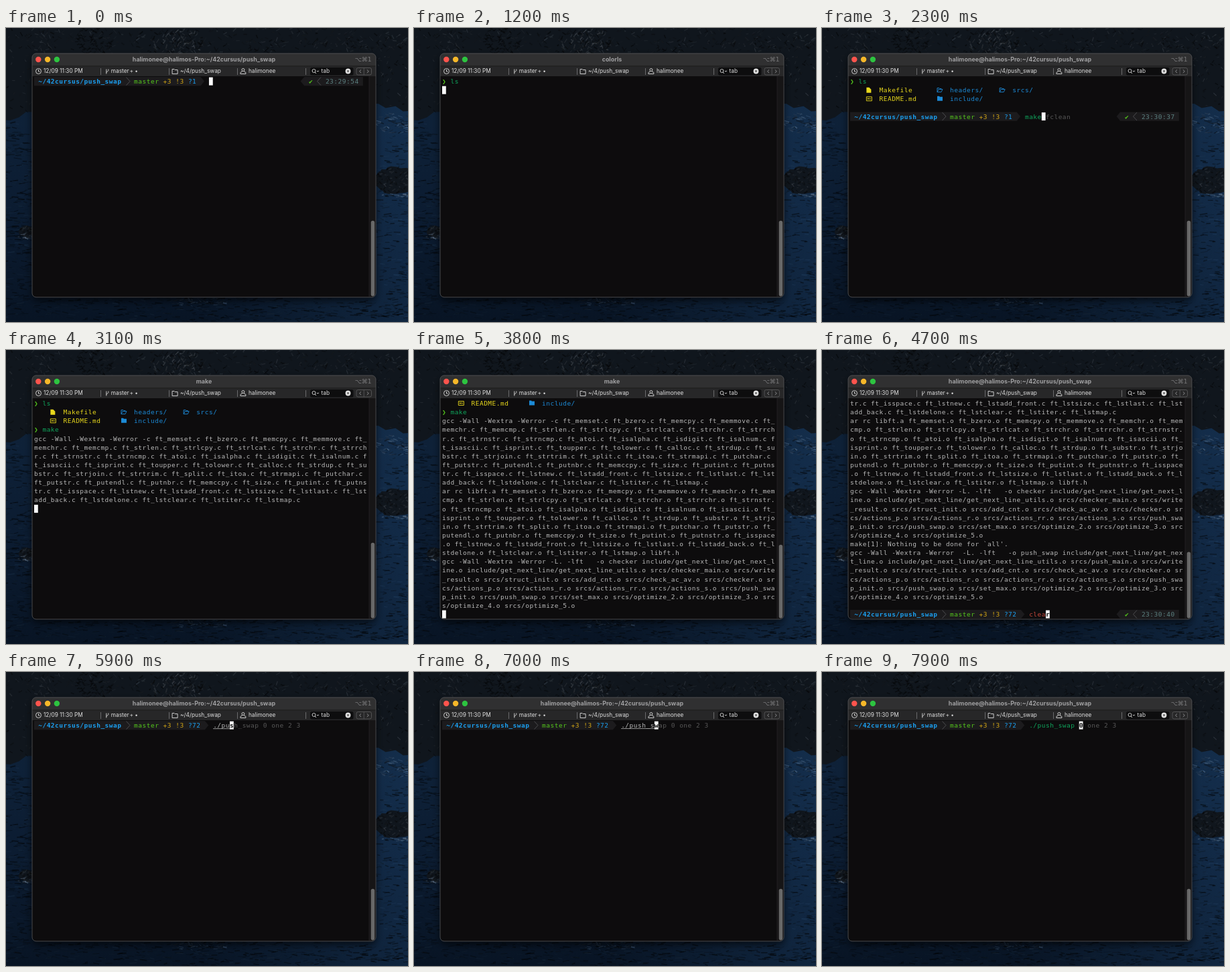
Recreate the animation shown at these times as an HTML page with a canvas. Size 600 by 439 pixels, loop 8 s.

```html
<!DOCTYPE html>
<html lang="en">
<head>
<meta charset="utf-8">
<title>Terminal session</title>
<style>
  html, body { margin: 0; width: 100%; height: 100%; overflow: hidden; background: #0a1626; }
  canvas { display: block; width: 100vw; height: 100vh; }
</style>
</head>
<body>
<canvas id="stage" width="600" height="439"></canvas>
<script>
const LOOP = 8000, W = 600, H = 439;
const CELL = 6.213, ROW = 13.125, LEFT = 42, TOP = 73, COLS = 80, ROWS = 25;
const WIN = { x: 39, y: 38, w: 513, h: 364, r: 6 };
const MONO = '"DejaVu Sans Mono", monospace', SANS = 'Inter, sans-serif';
const USER = 'halimonee', HOST = 'halimos-Pro';
const C = {
  text: '#b9b9b9', hint: '#575757', green: '#0fa45c', lime: '#55c81c', red: '#c4473a',
  yellow: '#d2a515', file: '#e8d81c', blue: '#1b9ff0', dir: '#1c8ad6', stamp: '#5c8080',
  segment: '#1c1b1d', edge: '#4c4c4f', body: '#0d0c0d', ink: '#dedede', dim: '#5c5c5e'
};
const canvas = document.getElementById('stage');
let ctx = canvas.getContext('2d');

// Terminal content

const libNames = ('memset bzero memcpy memmove memchr memcmp strlen strlcpy strlcat strchr strrchr strnstr ' +
  'strncmp atoi isalpha isdigit isalnum isascii isprint toupper tolower calloc strdup substr strjoin ' +
  'strtrim split itoa strmapi putchar putstr putendl putnbr memccpy size putint putnstr isspace lstnew ' +
  'lstadd_front lstsize lstlast lstadd_back lstdelone lstclear lstiter lstmap').split(' ');
const libFiles = ext => libNames.map(name => `ft_${name}.${ext}`).join(' ');
const srcNames = ('write_result struct_init add_cnt check_ac_av checker actions_p actions_r actions_rr ' +
  'actions_s push_swap_init push_swap set_max optimize_2 optimize_3 optimize_4 optimize_5').split(' ');
const link = (flags, target, main) => `gcc -Wall -Wextra -Werror ${flags} -lft   -o ${target} ` +
  'include/get_next_line/get_next_line.o include/get_next_line/get_next_line_utils.o ' +
  [main, ...srcNames].map(name => `srcs/${name}.o`).join(' ');

const span = (col, text, color) => ({ col, text, color });
const command = text => [span(0, '❯', C.lime), span(2, text, C.green)];
const listing = (icon, file, ...dirs) => [
  { col: 4, icon, color: C.file }, span(7, file, C.file),
  ...dirs.flatMap((dir, i) => [
    { col: 21 + 15 * i, icon: dir === 'include/' ? 'gear' : 'open', color: C.dir },
    span(24 + 15 * i, dir, C.dir)])
];
const wrap = text => text.match(new RegExp(`.{1,${COLS}}`, 'g')).map(part => [span(0, part, C.text)]);

// Each entry: time of output, lines
const output = [
  [1050, [command('ls')]],
  [1550, [listing('page', 'Makefile', 'headers/', 'srcs/'), listing('readme', 'README.md', 'include/')]],
  [2550, [command('make')]],
  [2650, wrap('gcc -Wall -Wextra -Werror -c ' + libFiles('c'))],
  [3450, wrap(`ar rc libft.a ${libFiles('o')} libft.h`)],
  [3550, wrap(link('-L.', 'checker', 'checker_main'))],
  [3850, [...wrap("make[1]: Nothing to be done for `all'."), ...wrap(link(' -L.', 'push_swap', 'push_main'))]]
];
const CLEARED = 5050, CLEARED_SCROLL = 34;

// Keys are struck from `start` on, one per `pace` ms, up to `length`
const prompts = [
  { from: 0, to: 1050, stamp: '23:29:54', files: '?1', line: 'ls', length: 2, start: 650, pace: 200 },
  { from: 1650, to: 2550, stamp: '23:30:37', files: '?1', line: 'make fclean', length: 4, start: 1850, pace: 100 },
  { from: 3950, to: CLEARED, stamp: '23:30:40', files: '?72', line: 'clear', length: 5, start: 4350, pace: 100 },
  { from: CLEARED, to: LOOP, stamp: '23:30:41', files: '?72', line: './push_swap 0 one 2 3',
    length: 12, start: 5100, pace: 250 }
];
const commands = ['l', 'ls', 'make', 'clear', './push_swap'];

// Icons as paths in an 8 by 8 box
const icons = {
  clock: 'M8 4A4 4 0 1 1 0 4A4 4 0 1 1 8 4M4 1.5V4.5H6',
  branch: 'M1 1V8M4 1V3L1 6',
  folder: 'M0 8V1H3L4 2H8V8Z',
  user: 'M2 2A2 2 0 1 1 6 2A2 2 0 1 1 2 2M3 4L0 6V8H8V6L5 4',
  search: 'M0 3A2 2 0 1 1 5 3A2 2 0 1 1 0 3M4 5L6 7M7 3L8 4L10 3',
  cross: 'M0 0L3 3M3 0L0 3',
  page: 'M0 0H4L7 3V8H0Z',
  readme: 'M0 1H8V7H0ZM2 5V3L3 4L4 3V5M6 3V5',
  gear: 'M0 0H3L4 1H8V7H0Z',
  open: 'M0 7V1H3L4 2H6V3M0 7L2 3H8L6 7Z'
};

// Drawing helpers

function icon(name, x, y, color, filled) {
  ctx.save();
  ctx.translate(x, y);
  ctx.strokeStyle = ctx.fillStyle = color;
  ctx.lineWidth = 0.9;
  const path = new Path2D(icons[name]);
  if (filled) ctx.fill(path);
  else ctx.stroke(path);
  ctx.restore();
}
function rect(x, y, w, h, color, radius = 0, outline = false) {
  ctx.fillStyle = ctx.strokeStyle = color;
  ctx.lineWidth = 0.8;
  ctx.beginPath();
  ctx.roundRect(x, y, w, h, radius);
  if (outline) ctx.stroke();
  else ctx.fill();
}
function circle(x, y, r, color) {
  rect(x - r, y - r, 2 * r, 2 * r, color, r);
}
function line(color, width, x1, y1, x2, y2) {
  ctx.strokeStyle = color;
  ctx.lineWidth = width;
  ctx.beginPath();
  ctx.moveTo(x1, y1);
  ctx.lineTo(x2, y2);
  ctx.stroke();
}
function chevron(x, y, dx, dy, color) {
  ctx.strokeStyle = color;
  ctx.lineWidth = 1;
  ctx.beginPath();
  ctx.moveTo(x - dx, y - dy);
  ctx.lineTo(x, y);
  ctx.lineTo(x - dx, y + dy);
  ctx.stroke();
}
// Bar with one flat end and one pointed end, whichever way round
function arrowBar(flat, tip, y, color) {
  const neck = tip - Math.sign(tip - flat) * 5.5;
  ctx.fillStyle = color;
  ctx.beginPath();
  ctx.moveTo(flat, y);
  ctx.lineTo(neck, y);
  ctx.lineTo(tip, y + ROW / 2);
  ctx.lineTo(neck, y + ROW);
  ctx.lineTo(flat, y + ROW);
  ctx.fill();
}
function label(text, x, y, font, color, align = 'left') {
  ctx.font = font;
  ctx.fillStyle = color;
  ctx.textAlign = align;
  ctx.fillText(text, x, y);
}
const cellX = col => LEFT + col * CELL;
const cellY = row => TOP + row * ROW;

function put(col, row, text, color, weight = '') {
  [...text].forEach((ch, i) => {
    if (ch !== ' ') label(ch, cellX(col + i), cellY(row) + 10, `${weight} 9.5px ${MONO}`, color);
  });
}

// Wallpaper: night coast

let seed = 7;
const random = () => (seed = seed * 16807 % 2147483647) / 2147483647;
const between = (a, b) => a + (b - a) * random();

// Short strokes scattered over an ellipse
function speckle(count, cx, cy, rx, ry, length, tilt, saturation, light) {
  for (let i = 0; i < count; i++) {
    const angle = between(0, 7), reach = Math.sqrt(random());
    const x = cx + rx * reach * Math.cos(angle), y = cy + ry * reach * Math.sin(angle);
    const color = `hsl(212 ${saturation}% ${light * random() ** 1.5}% / .5)`;
    line(color, between(0.5, 1.8), x, y, x + between(0.3, 1) * length, y + between(-1, 1) * tilt);
  }
}
function rock(cx, cy, rx, ry, detail) {
  ctx.beginPath();
  for (let a = 0; a < 6.28; a += 0.15) {
    const reach = between(0.9, 1.05);
    ctx.lineTo(cx + rx * reach * Math.cos(a), cy + ry * reach * Math.sin(a));
  }
  ctx.fillStyle = '#10161d';
  ctx.fill();
  speckle(detail, cx, cy, rx * 0.95, ry * 0.92, 5, 5, 12, 28);
}
function gradient(x2, y2, ...colors) {
  const fill = ctx.createLinearGradient(0, 0, x2, y2);
  colors.forEach((color, i) => fill.addColorStop(i / (colors.length - 1), color));
  ctx.fillStyle = fill;
  ctx.fillRect(0, 0, W, H);
}
function paintWallpaper() {
  gradient(0, H, '#0f2236', '#0e2138', '#0b1b30', '#081424');
  gradient(W, 0, '#1c406800', '#1c406800', '#1c406866');
  speckle(600, 0, 285, 50, 150, 12, 2, 50, 19);
  speckle(600, W, 285, 55, 150, 12, 2, 50, 26);
  speckle(500, W / 2, 420, 320, 20, 12, 2, 45, 16);
  speckle(90, 580, 142, 30, 16, 9, 3, 30, 60);

  rect(0, 0, W, 60, '#10161d');
  rock(0, 60, 90, 76, 160);
  rock(W, 60, 90, 64, 220);
  speckle(500, W / 2, 18, 320, 24, 6, 6, 14, 26);
  speckle(130, 255, 20, 40, 20, 5, 7, 8, 40);
  speckle(90, 130, 20, 28, 20, 6, 6, 20, 6);

  rock(582, 228, 34, 21, 120);
  speckle(30, 585, 249, 25, 4, 8, 2, 25, 60);
  rock(30, 304, 11, 9, 30);
  speckle(24, 28, 311, 12, 3, 7, 2, 20, 60);
  speckle(70, 288, 409, 45, 6, 7, 3, 30, 40);
}

// Window

function drawFrame() {
  const { x, y, w, h, r } = WIN;
  ctx.save();
  ctx.shadowColor = '#000a';
  ctx.shadowBlur = 12;
  ctx.shadowOffsetY = 5;
  rect(x, y, w, h, C.body, r);
  ctx.restore();
  rect(x, y, w, 19, '#303031', [r, r, 0, 0]);
  rect(x, 57, w, 15, '#272728');
  rect(x, 56.5, w, 0.7, '#141415');
  rect(542, 72, 9.5, 329, '#161516', [0, 0, r, 0]);
  line('#29272a', 0.7, 542, 72, 542, 401);
  ['#fe544d', '#f6b829', '#2dc440'].forEach((color, i) => circle(48.3 + 13.8 * i, 47, 4.2, color));
  label('⌥⌘1', 545.5, 49.5, '9px "DejaVu Sans", sans-serif', '#7a7a7c', 'right');
  rect(x, y, w, h, '#5a5a5c', r, true);
}

function drawStatus() {
  const font = `8.3px ${SANS}`, base = 67.4;
  const items = [
    ['clock', 11.5, '12/09 11:30 PM'], ['branch', 8, 'master\u200a+ •'],
    ['folder', 12, '~/4/push_swap'], ['user', 12, USER]
  ];
  items.forEach(([name, gap, text], i) => {
    const x = 44.5 + 101.8 * i + (name === 'branch' ? 2.5 : 0);
    icon(name, x, 60.5, C.ink);
    label(text, x + gap, base, font, C.ink);
    line('#6a6a6c', 1, 141.5 + 102 * i, 60, 141.5 + 102 * i, 70);
  });
  rect(454, 59, 64.5, 11.5, '#0d0d0e', 2.5);
  icon('search', 457, 61, C.ink);
  label('tab', 470.5, base, font, C.ink);
  circle(510.5, 64.5, 3.9, '#e4e4e4');
  icon('cross', 509, 63, '#111');
  rect(523, 59.5, 22.5, 10.5, C.dim, 2.5, true);
  line(C.dim, 0.8, 534.2, 59.5, 534.2, 70);
  chevron(527.5, 64.7, -2.5, 2.3, '#8a8a8c');
  chevron(541.3, 64.7, 2.5, 2.3, '#8a8a8c');
}

// Terminal lines

function drawCursor(col, row, under = '') {
  rect(cellX(col), cellY(row) + 0.6, 5.8, 12, '#fafafa');
  put(col, row, under, '#111', 'bold');
}

function drawPrompt(prompt, row, t) {
  const y = cellY(row), mid = y + ROW / 2;
  const start = 40 + prompt.files.length;
  arrowBar(LEFT, cellX(start - 1.1), y, C.segment);
  put(1, row, '~/42cursus/push_swap', C.blue, 'bold');
  chevron(185, mid, 5.5, 6, C.edge);
  put(24, row, 'master', C.lime);
  put(31, row, '+3 !3', C.yellow);
  put(37, row, prompt.files, C.blue);

  const struck = Math.floor((t - prompt.start) / prompt.pace) + 1;
  const count = Math.min(prompt.length, Math.max(0, struck));
  const typed = prompt.line.slice(0, count), hint = count ? prompt.line.slice(count) : '';
  const known = commands.includes(typed.trim()), path = typed.startsWith('.');
  put(start, row, typed, known ? C.green : path ? C.text : C.red);
  if (path && !known) rect(cellX(start), y + 11.3, count * CELL, 0.8, C.text);
  put(start + count, row, hint, C.hint);
  drawCursor(start + count, row, hint[0]);

  // The right side gives way to long input
  if (start + typed.length + hint.length < 62) {
    arrowBar(cellX(79), cellX(64), y, C.segment);
    put(66, row, '✔', C.lime);
    chevron(464.5, mid, -5.5, 6, C.edge);
    put(70, row, prompt.stamp, C.stamp);
  }
}

function drawTerminal(t) {
  const cleared = t >= CLEARED;
  const lines = cleared ? [] : output.filter(([time]) => time <= t).flatMap(([, rows]) => rows);
  const prompt = prompts.find(p => t >= p.from && t < p.to);
  if (prompt && lines.length) lines.push([]);
  const scroll = Math.max(0, lines.length + 1 - ROWS);

  lines.slice(scroll).forEach((spans, row) => spans.forEach(s => {
    if (s.icon) icon(s.icon, cellX(s.col) - 0.5, cellY(row) + 2.5, s.color, s.icon === 'page' || s.icon === 'gear');
    else put(s.col, row, s.text, s.color);
  }));
  const last = lines.length - scroll;
  if (prompt) drawPrompt(prompt, last, t);
  else drawCursor(0, last);

  // The thumb shrinks as the history grows
  const history = 48 + (cleared ? CLEARED_SCROLL : scroll);
  const thumb = 329 * ROWS / (ROWS + history);
  rect(544.7, 400.5 - thumb, 5.5, thumb, '#686868', 2.7);
  const running = t < 2000 ? 'colorls' : 'make';
  label(prompt ? `${USER}@${HOST}:~/42cursus/push_swap` : running, 295.5, 50, `bold 8.9px ${SANS}`, '#a0a0a2', 'center');
}

// The still parts are painted once and reused
const still = document.createElement('canvas');
still.width = W;
still.height = H;
const screen = ctx;
ctx = still.getContext('2d');
paintWallpaper();
drawFrame();
drawStatus();
ctx = screen;

function render(now) {
  ctx.drawImage(still, 0, 0);
  drawTerminal(now % LOOP);
  requestAnimationFrame(render);
}
render(0);
</script>
</body>
</html>
```
